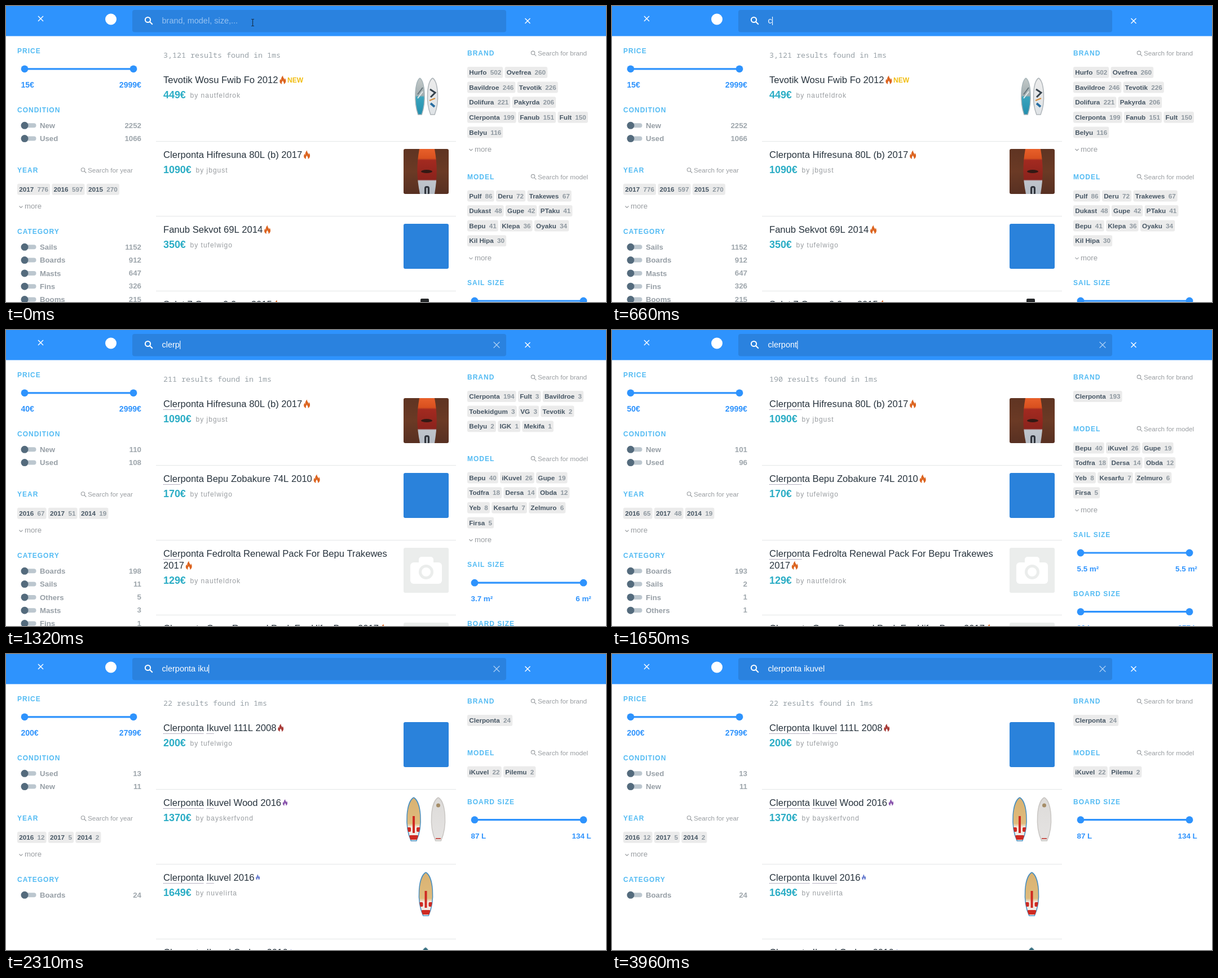
These frames come from a looping animation (1064 by 526 pixels, 4290 ms). An HTML page with a canvas:

```html
<!DOCTYPE html>
<html lang="en">
<head>
<meta charset="utf-8">
<title>Instant search</title>
<style>
html, body { margin: 0; width: 100%; height: 100%; overflow: hidden; background: #fff; }
canvas { display: block; }
</style>
</head>
<body>
<canvas id="stage" width="1064" height="526"></canvas>
<script>
const ctx = document.getElementById('stage').getContext('2d');
const STEP = 330, STEPS = 13;
const QUERY = 'clerponta ikuvel';
const TYPED = [0, 0, 1, 2, 5, 8, 10, 13, 16, 16, 16, 16, 16];
const CARET_OFF = [0, 1, 9, 10, 12];

const BLUE = '#2e93fd', SKY = '#53bbf3', GREY = '#999da1';
const ORANGE = '#dc6420', RED = '#a93c38', PURPLE = '#8a55ad', INDIGO = '#6b7fd0';

// Hits: [title lines, price, seller, picture, flame colour, flame scale, is new]
const common = [
  ['Clerponta Hifresuna 80L (b) 2017', '1090€', 'jbgust', 'deck'],
  ['Clerponta Bepu Zobakure 74L 2010', '170€', 'tufelwigo', 'badge'],
  ['Clerponta Fedrolta Renewal Pack For Bepu Trakewes|2017', '129€', 'nautfeldrok', 'camera'],
  ['Clerponta Gupe Renewal Pack For Hifra Bepu 2017', '', '', 'camera']
];

const VIEWS = {
  all: {
    found: '3,121', price: ['15€', '2999€'],
    condition: 'New 2252,Used 1066',
    year: '2017 776,2016 597,2015 270',
    category: 'Sails 1152,Boards 912,Masts 647,Fins 326,Booms 215',
    brand: 'Hurfo 502,Ovefrea 260|Bavildroe 246,Tevotik 226|Dolifura 221,Pakyrda 206|Clerponta 199,Fanub 151,Fult 150|Belyu 116',
    moreBrands: true,
    model: 'Pulf 86,Deru 72,Trakewes 67|Dukast 48,Gupe 42,PTaku 41|Bepu 41,Klepa 36,Oyaku 34|Kil Hipa 30',
    sizes: [['SAIL SIZE', '', '']],
    hits: [
      ['Tevotik Wosu Fwib Fo 2012', '449€', 'nautfeldrok', 'pair', ORANGE, 1, true],
      common[0],
      ['Fanub Sekvot 69L 2014', '350€', 'tufelwigo', 'badge'],
      ['Sulat 7 Gorva 0.0cm 2015', '', '', 'boot']
    ]
  },
  few: {
    found: '259', price: ['40€', '2999€'],
    condition: 'New 147,Used 122',
    year: '2016 77,2017 65,2015 23',
    category: 'Boards 223,Masts 17,Sails 16,Others 6,Fins 5',
    brand: 'Clerponta 199,Tevotik 19|Vrimolif 16,K7 4,Hurfo 4|MesarV 3,Belyu 3,Pimwas 3|Tobekidgum 3,L9 2',
    moreBrands: true,
    model: 'Bepu 41,iKuvel 26,Gupe 20|Todfra 18,Dersa 14,Obda 12|Trakewes 11,Yeb 8,Pudfok 8|Kesarfu 7',
    sizes: [['SAIL SIZE', '3.7 m²', '7.8 m²']],
    hits: common
  },
  fewer: {
    found: '211', price: ['40€', '2999€'],
    condition: 'New 110,Used 108',
    year: '2016 67,2017 51,2014 19',
    category: 'Boards 198,Sails 11,Others 5,Masts 3,Fins 1',
    brand: 'Clerponta 194,Fult 3,Bavildroe 3|Tobekidgum 3,VG 3,Tevotik 2|Belyu 2,IGK 1,Mekifa 1',
    model: 'Bepu 40,iKuvel 26,Gupe 19|Todfra 18,Dersa 14,Obda 12|Yeb 8,Kesarfu 7,Zelmuro 6|Firsa 5',
    sizes: [['SAIL SIZE', '3.7 m²', '6 m²'], ['BOARD SIZE', '', '']],
    hits: common
  },
  maker: {
    found: '190', price: ['50€', '2999€'],
    condition: 'New 101,Used 96',
    year: '2016 65,2017 48,2014 19',
    category: 'Boards 193,Sails 2,Fins 1,Others 1',
    brand: 'Clerponta 193',
    model: 'Bepu 40,iKuvel 26,Gupe 19|Todfra 18,Dersa 14,Obda 12|Yeb 8,Kesarfu 7,Zelmuro 6|Firsa 5',
    sizes: [['SAIL SIZE', '5.5 m²', '5.5 m²'], ['BOARD SIZE', '80 L', '277 L']],
    hits: common
  },
  exact: {
    found: '22', price: ['200€', '2799€'],
    condition: 'Used 13,New 11',
    year: '2016 12,2017 5,2014 2',
    category: 'Boards 24',
    brand: 'Clerponta 24',
    model: 'iKuvel 22,Pilemu 2',
    sizes: [['BOARD SIZE', '87 L', '134 L']],
    hits: [
      ['Clerponta Ikuvel 111L 2008', '200€', 'tufelwigo', 'badge', RED, .9],
      ['Clerponta Ikuvel Wood 2016', '1370€', 'bayskerfvond', 'woodPair', PURPLE, .76],
      ['Clerponta Ikuvel 2016', '1649€', 'nuvelirta', 'wood', INDIGO, .65],
      ['Clerponta Ikuvel Carbon 2016', '', '', 'tip', INDIGO, .65]
    ]
  }
};
const ORDER = ['all', 'all', 'all', 'few', 'fewer', 'maker', 'maker'];

// Draws text centred on y by cap height and returns its width.
function text(str, x, y, px, color, { bold, right, gap = 0, mono } = {}) {
  const family = mono ? '"Noto Sans Mono", monospace' : '"Liberation Sans", Arial, sans-serif';
  ctx.font = `${bold ? 'bold ' : ''}${px}px ${family}`;
  ctx.letterSpacing = gap + 'px';
  ctx.textAlign = right ? 'right' : 'left';
  ctx.fillStyle = color;
  ctx.fillText(str, x, y + px * .36);
  return ctx.measureText(str).width;
}

function box(x, y, w, h, r, color) {
  ctx.fillStyle = color;
  ctx.beginPath();
  ctx.roundRect(x, y, w, h, r);
  ctx.fill();
}

function disc(x, y, r, color) {
  ctx.fillStyle = color;
  ctx.beginPath();
  ctx.arc(x, y, r, 0, Math.PI * 2);
  ctx.fill();
}

function line(color, width, ...points) {
  ctx.strokeStyle = color;
  ctx.lineWidth = width;
  ctx.beginPath();
  points.forEach(([x, y]) => ctx.lineTo(x, y));
  ctx.stroke();
}

function cross(x, y, r, color, width) {
  line(color, width, [x - r, y - r], [x + r, y + r]);
  line(color, width, [x - r, y + r], [x + r, y - r]);
}

function lens(x, y, r, color, width) {
  line(color, width, [x + r * .7, y + r * .7], [x + r * 1.8, y + r * 1.8]);
  ctx.beginPath();
  ctx.arc(x, y, r, 0, Math.PI * 2);
  ctx.stroke();
}

function heading(str, x, y) {
  text(str, x, y, 12, SKY, { bold: true, gap: 1 });
}

function finder(str, x, y) {
  lens(x - 8.5, y - 1, 3.2, GREY, 1.1);
  text('Search for ' + str, x, y - .3, 11.7, GREY);
}

function more(x, y) {
  line(GREY, 1.1, [x + 3.5, y - 1], [x + 6.5, y + 2], [x + 9.5, y - 1]);
  text('more', x + 13, y - 1, 13.2, GREY);
}

function slider(x, y, [low, high]) {
  line(BLUE, 3.2, [x, y], [x + 193, y]);
  disc(x, y, 6.4, BLUE);
  disc(x + 193, y, 6.4, BLUE);
  const px = low.endsWith('€') ? 14 : 13.4;
  text(low, x - 6.5, y + 28.2, px, BLUE, { bold: true });
  text(high, x + 206.8, y + 28.2, px, BLUE, { bold: true, right: true });
}

function split(item) {
  const at = item.lastIndexOf(' ');
  return [item.slice(0, at), item.slice(at + 1)];
}

// Returns the y of the last row.
function chips(list, x0, y) {
  const rows = list.split('|');
  rows.forEach((row, i) => {
    let x = x0;
    const cy = y + i * 26.6;
    for (const [name, count] of row.split(',').map(split)) {
      ctx.font = 'bold 11.7px "Liberation Sans", Arial, sans-serif';
      ctx.letterSpacing = '0px';
      const nameW = ctx.measureText(name).width;
      const w = nameW + ctx.measureText(count).width + 12.6;
      box(x, cy - 10, w, 20, 3, '#ebebeb');
      text(name, x + 3.2, cy, 11.7, '#465664', { bold: true });
      text(count, x + nameW + 9.5, cy, 11.7, '#8d979f', { bold: true });
      x += w + 3.3;
    }
  });
  return y + (rows.length - 1) * 26.6;
}

function toggles(list, y) {
  list.split(',').map(split).forEach(([name, count], i) => {
    const cy = y + i * 23.3;
    box(30, cy - 4, 23.5, 8, 4, '#bcc7cf');
    disc(33, cy, 6.5, '#546b7d');
    text(name, 60, cy, 13.2, '#979fa6', { bold: true });
    text(count, 240, cy - .5, 13.3, '#9ea6ac', { bold: true, right: true });
  });
}

function flame(x, y, scale, color) {
  ctx.save();
  ctx.translate(x, y);
  ctx.scale(scale, scale);
  ctx.fillStyle = color;
  ctx.beginPath();
  ctx.moveTo(6.5, -8);
  ctx.bezierCurveTo(6, -4, 9, -3, 9, -.5);
  ctx.quadraticCurveTo(10, -1.5, 10, -3.5);
  ctx.bezierCurveTo(13, 1, 11.5, 6, 8, 7.5);
  ctx.bezierCurveTo(9, 4, 6.5, 4, 6.5, 1);
  ctx.bezierCurveTo(4, 3, 4, 6, 4.5, 7.5);
  ctx.bezierCurveTo(-1, 5, .5, 0, 2.2, -2);
  ctx.quadraticCurveTo(2.5, 0, 3.3, .4);
  ctx.bezierCurveTo(2.8, -3, 4, -6, 6.5, -8);
  ctx.fill();
  ctx.restore();
}

function gradient(y, h, stops) {
  const g = ctx.createLinearGradient(0, y, 0, y + h);
  stops.forEach(([at, color]) => g.addColorStop(at, color));
  return g;
}

function boardPath(cx, y, w, h) {
  ctx.beginPath();
  ctx.moveTo(cx, y);
  ctx.bezierCurveTo(cx + w * .55, y + h * .1, cx + w * .7, y + h * .65, cx + w * .2, y + h);
  ctx.lineTo(cx - w * .2, y + h);
  ctx.bezierCurveTo(cx - w * .7, y + h * .65, cx - w * .55, y + h * .1, cx, y);
}

function board(cx, y, w, h, stops, edge) {
  boardPath(cx, y, w, h);
  ctx.fillStyle = gradient(y, h, stops);
  ctx.fill();
  ctx.strokeStyle = edge;
  ctx.lineWidth = 1.5;
  ctx.stroke();
}

function woodBoard(cx, y) {
  board(cx, y + 1, 24, 77, [[0, '#d9b271'], [.6, '#dfbb7d'], [.68, '#f1e8de'], [1, '#f3eeea']], '#4a8fc0');
  ctx.save();
  boardPath(cx, y + 1, 24, 77);
  ctx.clip();
  box(cx - 2, y + 34, 4, 30, 0, '#cf2a22');
  box(cx - 12, y + 54, 7, 8, 2, '#cf2a22');
  box(cx + 5, y + 54, 7, 8, 2, '#cf2a22');
  box(cx - 8, y + 68, 16, 8, 2, '#cf2a22');
  ctx.restore();
}

const PICTURES = {
  badge: y => box(705, y, 80, 80, 3, '#2a82db'),
  camera(y) {
    box(705, y, 80, 80, 3, '#ebedec');
    box(717, y + 26, 56, 38, 6, '#fff');
    box(732, y + 16, 26, 16, 5, '#fff');
    disc(745, y + 43, 13, '#ebedec');
    disc(745, y + 43, 8, '#fff');
  },
  deck(y) {
    ctx.save();
    ctx.beginPath();
    ctx.roundRect(705, y, 80, 80, 3);
    ctx.clip();
    ctx.fillStyle = gradient(y, 80, [[0, '#5f3422'], [.5, '#6b3a25'], [1, '#573022']]);
    ctx.fillRect(705, y, 80, 80);
    ctx.beginPath();
    ctx.moveTo(733, y);
    ctx.bezierCurveTo(728, y + 28, 728, y + 50, 734, y + 80);
    ctx.lineTo(760, y + 80);
    ctx.bezierCurveTo(765, y + 50, 765, y + 28, 760, y);
    ctx.fillStyle = gradient(y, 80, [[0, '#e8602a'], [.21, '#d8501f'], [.25, '#a32a20'], [.68, '#8a231c'], [.71, '#c0c5cc'], [1, '#b5bcc5']]);
    ctx.fill();
    ctx.beginPath();
    ctx.ellipse(746, y + 40, 10, 3, 0, 0, Math.PI * 2);
    ctx.fillStyle = '#331914';
    ctx.fill();
    box(742, y + 66, 9, 16, 4, '#30343c');
    box(745, y + 69, 3, 11, 1, '#aab1b9');
    ctx.restore();
  },
  pair(y) {
    board(734, y + 7, 16, 65, [[0, '#c3c9c8'], [.48, '#a2aeb1'], [.52, '#3ba4bd'], [1, '#238fae']], '#a4b3b8');
    line('#66757c', 2, [730, y + 36], [739, y + 24]);
    line('#e4eaeb', 2, [730, y + 43], [739, y + 31]);
    board(756.5, y + 7, 18, 65, [[0, '#ececec'], [1, '#dfe3e6']], '#b0b6ba');
    line('#36434d', 3, [752, y + 27], [761, y + 33], [753, y + 41]);
    line('#d58c39', 2, [751, y + 47], [761, y + 43]);
    line('#286da0', 4, [753, y + 52], [760, y + 58]);
  },
  woodPair(y) {
    woodBoard(723, y);
    board(766.5, y + 1, 24, 77, [[0, '#dddbd9'], [1, '#e5e3e2']], '#cac7c4');
    disc(766.5, y + 15, 3.5, '#a58d68');
    line('#c85751', 2, [762, y + 74], [771, y + 74]);
  },
  wood: y => woodBoard(744.5, y),
  boot: y => box(735, y, 15, 10, 2, '#252729'),
  tip: y => board(744, y + 2, 22, 77, [[0, '#356d80'], [1, '#3c8094']], '#4c7d8c')
};

function underline(title, y, marks) {
  const words = title.split(' ');
  let before = '';
  ctx.font = '16.6px "Liberation Sans", Arial, sans-serif';
  ctx.letterSpacing = '0px';
  ctx.setLineDash([1, 1]);
  marks.forEach((n, i) => {
    const x = 279 + ctx.measureText(before).width;
    const w = ctx.measureText(words[i].slice(0, n)).width;
    line('#6f6685', 1, [x, y], [x + w, y]);
    before += words[i] + ' ';
  });
  ctx.setLineDash([]);
}

function hit([title, price, seller, picture, color = ORANGE, scale = 1, fresh], i, marks) {
  const top = i * 133;
  const lines = title.split('|');
  let y = 131.5 + top, end = 0;
  lines.forEach((str, n) => {
    end = 279 + text(str, 279, y + n * 21, 16.6, '#27333d');
  });
  underline(lines[0], top + 141.5, marks);
  y += (lines.length - 1) * 21;
  flame(end + 2.2, y - (1 - scale) * 2, scale, color);
  if (fresh) text('NEW', end + 16.5, y + .5, 12, '#f1bd10', { bold: true });
  if (price) {
    const w = text(price, 279, y + 25.8, 17.9, '#2badc5', { bold: true });
    text('by ' + seller, 279 + w + 7.8, y + 27, 12, GREY, { gap: 1 });
  }
  PICTURES[picture](top + 121);
  line('#e4e6e7', 1, [266, top + 240.5], [798, top + 240.5]);
}

function header(step) {
  box(0, 0, 1064, 53.5, 0, BLUE);
  cross(61.5, 22.5, 4.5, '#fff', 1.4);
  disc(186, 23.5, 10, '#fff');
  box(224, 7, 663, 39.5, 4, '#2a82df');
  lens(251.5, 24.5, 4.6, '#fff', 2);
  cross(925, 26.5, 4.5, '#fff', 1.4);
  const typed = QUERY.slice(0, TYPED[step]);
  if (!typed) {
    text('brand, model, size,...', 276.5, 26, 14.5, '#96c2f1');
    line('#17324f', 1.2, [437.5, 24], [437.5, 35]);
    line('#17324f', 1, [435, 23.5], [440, 23.5]);
    line('#17324f', 1, [435, 35.5], [440, 35.5]);
    return;
  }
  const w = text(typed, 276.5, 26, 14.5, '#fff');
  if (!CARET_OFF.includes(step)) line('#fff', 1.1, [277.3 + w, 19], [277.3 + w, 34]);
  if (step > 2) cross(870, 26.5, 5.3, '#a8cdf5', 1.4);
}

function leftSide(v) {
  heading('PRICE', 20, 80);
  slider(33, 111.8, v.price);
  heading('CONDITION', 20, 184.5);
  toggles(v.condition, 212.3);
  heading('YEAR', 20, 292);
  finder('year', 145, 292);
  chips(v.year, 20, 325.7);
  more(20, 356.5);
  heading('CATEGORY', 20, 400.5);
  toggles(v.category, 428.3);
}

function rightSide(v) {
  heading('BRAND', 818, 84);
  finder('brand', 943, 84.3);
  let y = chips(v.brand, 818, 118);
  if (v.moreBrands) more(818, y + 30.6);
  y += v.moreBrands ? 79 : 57.4;
  heading('MODEL', 818, y);
  finder('model', 943, y + .2);
  const manyModels = v.model.includes('|');
  y = chips(v.model, 818, y + 34);
  if (manyModels) more(818, y + 30.6);
  y += manyModels ? 74.6 : 53.1;
  for (const [name, ...range] of v.sizes) {
    heading(name, 818, y);
    slider(831, y + 32.2, range);
    y += 104.7;
  }
}

// Number of marked letters in each leading title word.
function marksAt(step) {
  if (step < 3) return [];
  if (step < 7) return [[2, 4, 7, 9][step - 3]];
  return [9, step === 7 ? 2 : 6];
}

function draw(step) {
  const v = VIEWS[ORDER[step] || 'exact'];
  ctx.fillStyle = '#fff';
  ctx.fillRect(0, 0, 1064, 526);
  header(step);
  leftSide(v);
  text(v.found + ' results found in 1ms', 279, 87.3, 13.33, '#99a2a8', { mono: true });
  v.hits.forEach((h, i) => hit(h, i, marksAt(step)));
  rightSide(v);
}

const start = performance.now();
function tick() {
  const t = performance.now() - start;
  draw(Math.floor(t / STEP) % STEPS);
  requestAnimationFrame(tick);
}
tick();
</script>
</body>
</html>
```
